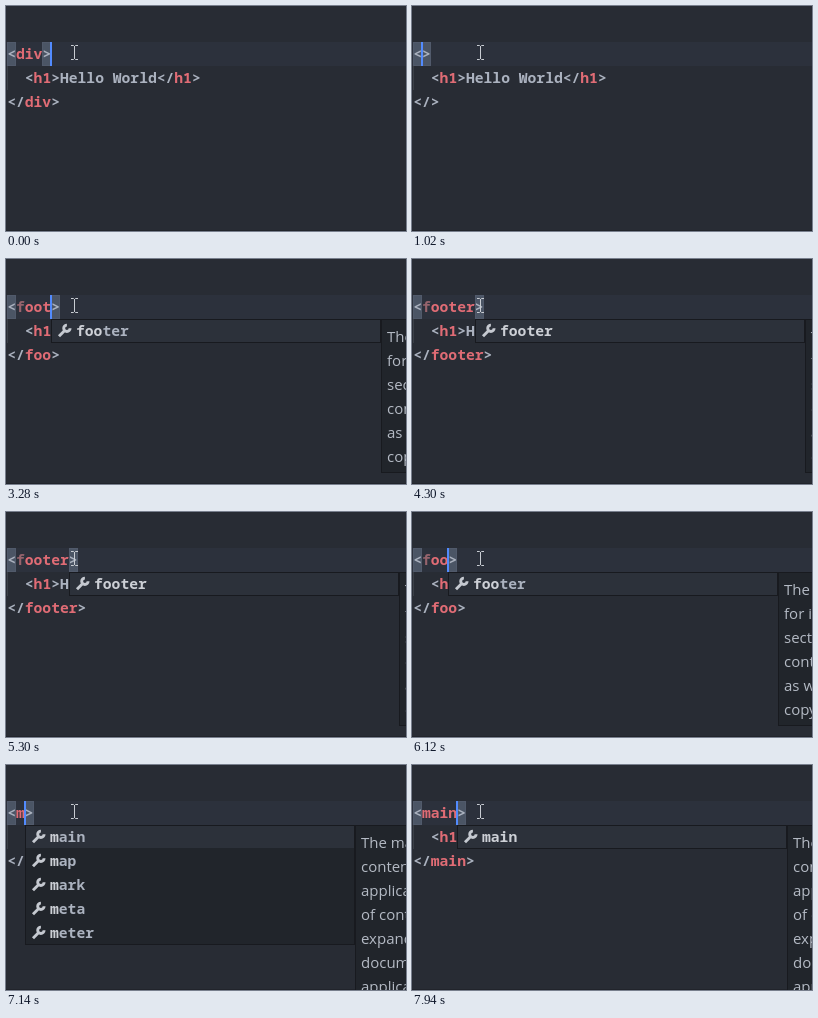
Animation, 400 px wide and 225 px high, one loop 8 s. Source, as an HTML page:

```html
<!DOCTYPE html>
<html lang="en">
<head>
<meta charset="utf-8">
<title>Linked tag editing</title>
<style>
  html, body { margin: 0; width: 100%; height: 100%; overflow: hidden; background: #282c34; }
  svg { display: block; width: 400px; height: 225px; }
  .code { font: 700 14.667px "Noto Sans Mono", "DejaVu Sans Mono", monospace; fill: #abb2bf; }
  .tag { fill: #e06c75; }
  .dim { fill: #96646d; }
  .hit { fill: #cdd0d6; }
  .doc { font: 15px "Open Sans", "Noto Sans", sans-serif; fill: #b4bac4; }
  .panel { fill: #21252b; stroke: #181a1f; }
  .icon { fill: none; stroke: #c5c9d0; stroke-width: 2.9; }
</style>
</head>
<body>
<svg viewBox="0 0 400 225">
  <rect width="400" height="225" fill="#282c34"/>
  <rect y="36" width="400" height="24" fill="#2c313c"/>
  <rect x="1" y="60" width="1" height="24" fill="#3b4048"/>
  <rect y="224" width="400" height="1" fill="#21242b"/>
  <g id="scene"></g>
  <path d="M65 39.5h2.5l1 1 1-1H72M68.5 40v13M65 53.5h2.5l1-1 1 1H72" fill="none" stroke="#c8ccd2"/>
</svg>
<script>
const DURATION = 8000, LINE = 24, ADVANCE = 8.8, ORIGIN = 0.5, TEXT_X = 1.2;
const scene = document.getElementById('scene');

const docs = {
  fieldset: ['The fieldset element represents a set of', 'form controls optionally grouped under a', 'common name.'],
  footer: ['The footer element represents a footer', 'for its nearest ancestor sectioning', 'sectioning root element. A footer', 'contains information about its section',
    'as who wrote it, links to related', 'copyright data, and the like.'],
  main: ['The main element represents the main', 'content of the body of a document or', 'application. The main content area consists', 'of content that is directly related to or',
    'expands upon the central topic of a', 'document or central functionality of an', 'application.']
};
const tags = ['fieldset', 'figcaption', 'figure', 'footer', 'form', 'main', 'map', 'mark', 'meta', 'meter'];

// [start, opening name, closing name, suggestion prefix, options]
const steps = [
  [0, 'div', 'div', '', { caret: 5 }],
  [220, 'div', 'div', ''],
  [420, 'di', 'div', ''],
  [620, 'd', 'di', ''],
  [820, '', 'd', ''],
  [1020, '', '', ''],
  [1440, 'f', '', ''],
  [1640, 'f', 'f', 'f', { noDoc: true }],
  [1840, 'f', 'f', 'f'],
  [2260, 'fo', 'f', 'fo'],
  [2460, 'foo', 'fo', 'foo', { noDoc: true }],
  [2660, 'foo', 'foo', 'foo'],
  [3060, 'foot', 'foo', 'foo'],
  [3280, 'foot', 'foo', 'foo', { at: 5 }],
  [3480, 'foote', 'foot', 'foot', { at: 6 }],
  [3680, 'footer', 'foote', 'foote', { at: 7 }],
  [3880, 'footer', 'footer', 'footer'],
  [4300, 'footer', 'footer', 'footer', { caret: 0 }],
  [4900, 'footer', 'footer', 'footer'],
  [5300, 'footer', 'footer', 'footer', { caret: 0 }],
  [5700, 'foote', 'footer', 'foote'],
  [5900, 'foot', 'foote', 'foot'],
  [6120, 'foo', 'foo', 'foo'],
  [6320, 'fo', 'foo', 'fo'],
  [6520, 'f', 'fo', 'f'],
  [6720, '', '', ''],
  [7140, 'm', 'm', 'm'],
  [7340, 'ma', 'm', 'ma'],
  [7540, 'mai', 'ma', 'mai'],
  [7740, 'main', 'mai', 'mai', { at: 5 }],
  [7940, 'main', 'main', 'main']
];

const column = i => ORIGIN + i * ADVANCE;
const rect = (x, y, w, h, attrs) => `<rect x="${x}" y="${y}" width="${w}" height="${h}" ${attrs}/>`;
const text = (x, y, content, cls = 'code') => `<text class="${cls}" x="${x}" y="${y}">${content}</text>`;
const span = (s, cls = 'tag') => `<tspan class="${cls}">${s}</tspan>`;
const bracket = i => rect(Math.ceil(column(i)) + .5, 36.5, 8, 23, 'fill="#4b5565" stroke="#515a6b"');
const wrench = (x, y) =>
  `<path class="icon" transform="translate(${x} ${y})" d="M9.4 1.6A3.2 3.2 0 1 0 12.6 4.8M7.2 7L1.5 12.7"/>`;

const openingName = name =>
  name[0] === 'f' ? span('f', 'dim') + span(name.slice(1)) : span(name);

function popup(prefix, at, noDoc) {
  const items = tags.filter(tag => tag.startsWith(prefix));
  const x = Math.floor(column(at)) + 1;
  let out = rect(x + .5, 60.5, 329, items.length * LINE - 1, 'class="panel"');
  out += rect(x + 1, 61, 328, LINE - 2, 'fill="#2c313a"');
  items.forEach((tag, i) => {
    const y = 60 + i * LINE;
    out += wrench(x + 6.5, y + 4.5);
    out += text(x + 25, y + 17, span(prefix, 'hit') + tag.slice(prefix.length));
  });
  const lines = docs[items[0]];
  if (noDoc || !lines) return out;
  out += rect(x + 330.5, 60.5, 330, lines.length * LINE + 9, 'class="panel"');
  lines.forEach((line, i) => out += text(x + 336, 83 + i * LINE, line, 'doc'));
  return out;
}

function draw([, name, closing, prefix, { caret, at, noDoc } = {}]) {
  const end = name.length + 1;
  const caretAt = caret ?? end;
  let out = bracket(0) + bracket(end);
  out += text(TEXT_X, 53, `&lt;${openingName(name)}&gt;`);
  out += text(TEXT_X + 2 * ADVANCE, 77, `&lt;${span('h1')}&gt;Hello World&lt;/${span('h1')}&gt;`);
  out += text(TEXT_X, 101, `&lt;/${span(closing)}&gt;`);
  if (caretAt) out += rect(Math.floor(column(caretAt)), 36, 2, LINE, 'fill="#528bff"');
  if (prefix) out += popup(prefix, at ?? prefix.length + 1, noDoc);
  scene.innerHTML = out;
}

let shown;
function tick() {
  const time = performance.now() % DURATION;
  const step = steps.findLast(s => s[0] <= time);
  if (step !== shown) draw(shown = step);
  requestAnimationFrame(tick);
}
tick();
</script>
</body>
</html>
```
